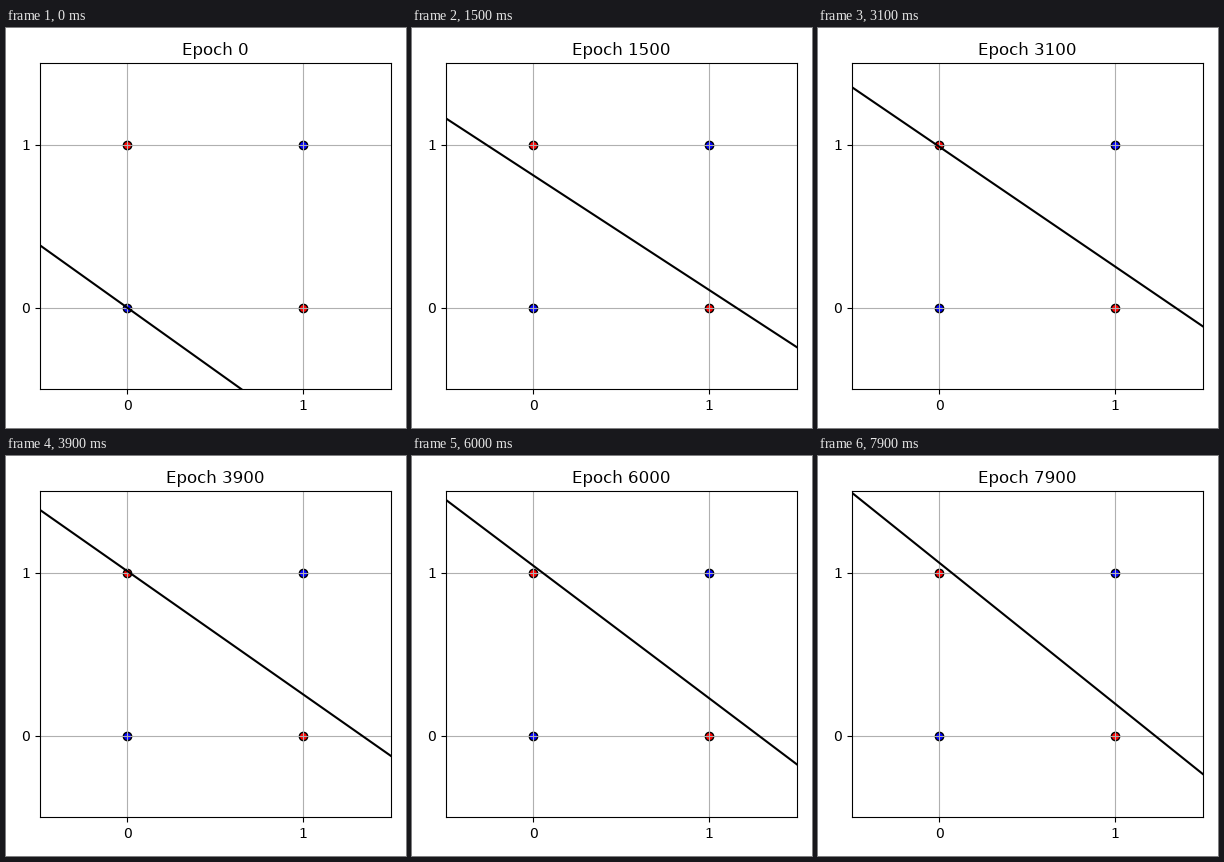
These frames come from a looping animation (400 px wide and 400 px high, 8 s). A matplotlib script:

```python
import matplotlib.pyplot as plt
import numpy as np
from matplotlib.animation import FuncAnimation

FRAMES = 80
INTERVAL = 100  # ms, also epochs per frame
LOW, HIGH = -0.5, 1.5

plt.rcParams["text.hinting"] = "native"


def boundary(k):
    """Slope and intercept of the decision line after k thousand epochs."""
    slope = -0.6493 - 0.0272 * k - 0.1207 * np.exp(-k / 0.67)
    drift = 1.09 - 0.2112 * np.exp(-k / 4)
    intercept = drift - 0.8788 * np.exp(-0.885 * k - 0.25 * k**2)
    return slope, intercept


fig, ax = plt.subplots(figsize=(4, 4), dpi=100)
ax.scatter([0, 1], [0, 1], c="blue", edgecolors="black")
ax.scatter([0, 1], [1, 0], c="red", edgecolors="black")
ax.set(xlim=(LOW, HIGH), ylim=(LOW, HIGH), xticks=[0, 1], yticks=[0, 1])
ax.grid(True)
title = ax.set_title("Epoch 0")
line, = ax.plot([], [], color="black")
fig.tight_layout()
fig.subplots_adjust(top=0.9117)

xs = np.array([LOW, HIGH])


def update(i):
    epoch = i * INTERVAL
    slope, intercept = boundary(epoch / 1000)
    line.set_data(xs, slope * xs + intercept)
    title.set_text(f"Epoch {epoch}")
    return line, title


anim = FuncAnimation(fig, update, frames=FRAMES, interval=INTERVAL,
                     repeat=True, repeat_delay=0)
plt.show()
```
